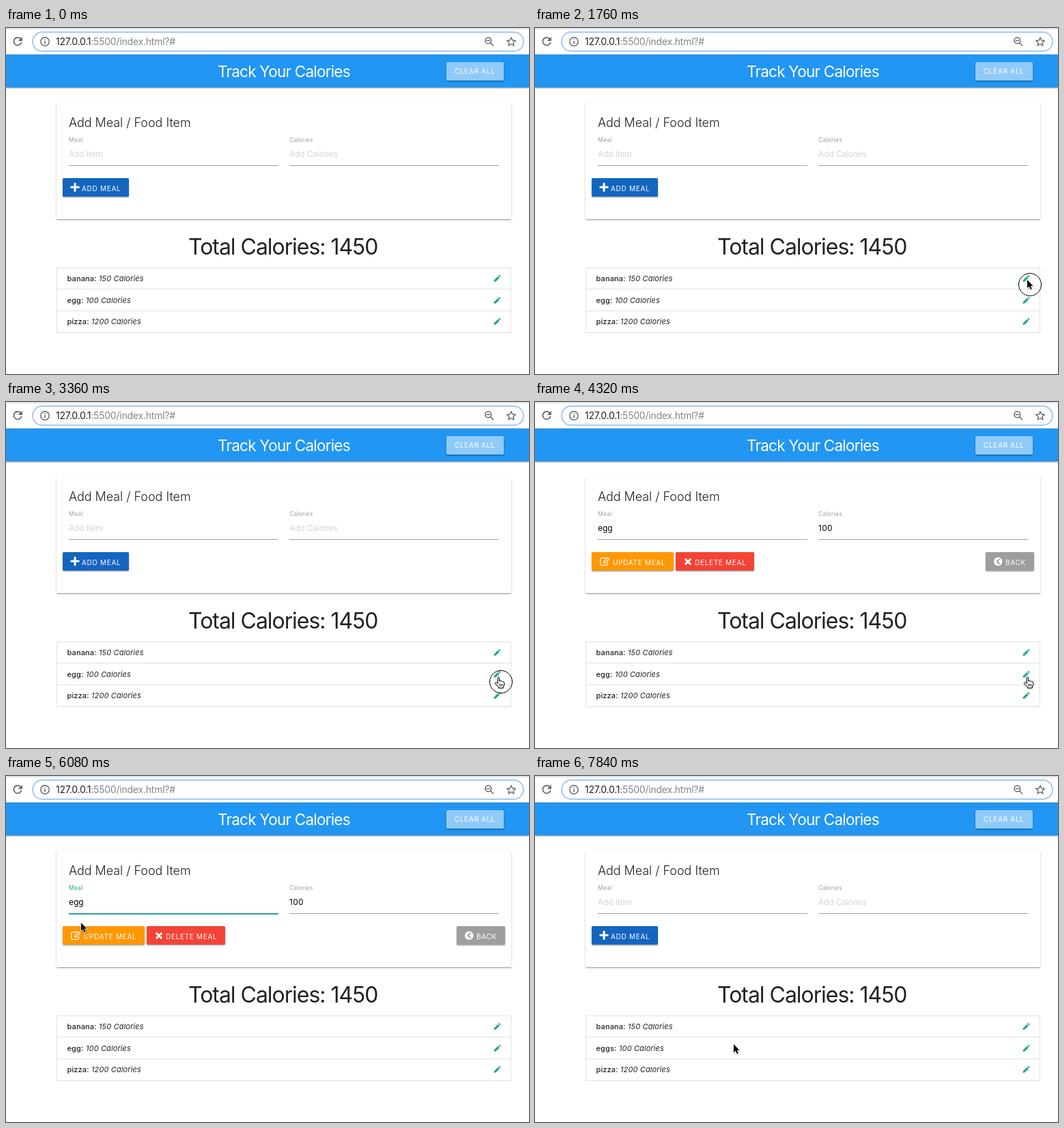
An HTML page for the animation above (8000 ms loop, 766 px wide and 507 px high).

```html
<!DOCTYPE html>
<html lang="en">
<head>
<meta charset="utf-8">
<title>Calorie tracker</title>
<style>
html, body { margin: 0; width: 100%; height: 100%; overflow: hidden; background: #fff; }
#stage { position: relative; width: 766px; height: 507px; overflow: hidden; background: #fff; }
.box { position: absolute; border-radius: 1.5px; }
.raised { box-shadow: 0 1.5px 1.5px rgba(0,0,0,.14), 0 2px 1px -1px rgba(0,0,0,.12), 0 1px 3px rgba(0,0,0,.2); }
svg { position: absolute; left: 0; top: 0; }
text { font-family: Inter, "Open Sans", sans-serif; font-optical-sizing: none; white-space: pre; }
.url { font-size: 14px; letter-spacing: -.22px; fill: #80868b; }
.brand { font-size: 22.6px; letter-spacing: -.8px; fill: #fff; }
.head { font-size: 18px; font-weight: 300; letter-spacing: -.05px; fill: #212121; }
.total { font-size: 32px; letter-spacing: -1.02px; fill: #212121; }
.btn { font-size: 10px; letter-spacing: .7px; fill: #fff; }
.label { font-size: 8.5px; letter-spacing: .22px; fill: #9e9e9e; }
.hint { font-size: 12px; font-weight: 300; letter-spacing: -.05px; fill: #c9c9c9; }
.value { font-size: 12px; fill: #000; }
.name { font-size: 11px; font-weight: 500; letter-spacing: .12px; fill: #212121; }
.count { font-size: 11px; font-style: italic; letter-spacing: .12px; fill: #212121; }
.line { fill: none; stroke-linecap: round; stroke-linejoin: round; }
</style>
</head>
<body>
<div id="stage">
  <div class="box" style="left:0;top:0;width:766px;height:2px;background:#e3e4e6"></div>
  <div class="box" style="left:0;top:38px;width:766px;height:1px;background:#cfd1d4"></div>
  <div class="box raised" style="left:0;top:39px;width:766px;height:48px;background:#2196f3;border-radius:0"></div>
  <div class="box raised" style="left:645px;top:50px;width:84px;height:27px;background:#90caf9"></div>
  <div class="box raised" style="left:74px;top:109px;width:666px;height:171px;background:#fff"></div>
  <div id="addBox" class="box raised" style="left:83px;top:220px;width:97px;height:27px;background:#1565c0"></div>
  <div id="editBoxes">
    <div class="box raised" style="left:83px;top:220px;width:120px;height:27px;background:#ff9800"></div>
    <div class="box raised" style="left:206px;top:220px;width:115px;height:27px;background:#f44336"></div>
    <div class="box raised" style="left:660px;top:220px;width:71px;height:27px;background:#9e9e9e"></div>
  </div>

  <svg width="766" height="507" viewBox="0 0 766 507">
    <defs>
      <g id="pencil" fill="#26a69a">
        <path d="M0 10 .5 7.2 5.9 1.8 8.3 4.2 2.9 9.6Z"/>
        <path d="M6.6 1.1 7.5.3Q8.1-.1 8.6.3L9.8 1.5Q10.2 2 9.8 2.6L9 3.5Z"/>
      </g>
    </defs>

    <!-- browser bar -->
    <g class="line" stroke="#5f6368" stroke-width="1.7">
      <path d="M21.6 16.2A5.7 5.7 0 1 0 22.5 21.4"/>
      <circle cx="57" cy="20" r="6.2" stroke-width="1.4"/>
      <path d="M57 19.6V23M57 17V17.1" stroke-width="1.5"/>
      <circle cx="706.3" cy="18.4" r="4.4" stroke-width="1.5"/>
      <path d="M709.7 21.8 713.6 25.7M704.3 18.4H708.3" stroke-width="1.5"/>
      <path d="M740 13.8 741.8 18 746.4 18.4 742.9 21.4 744 25.9 740 23.5 736 25.9 737.1 21.4 733.6 18.4 738.2 18Z" stroke-width="1.3"/>
    </g>
    <path d="M23.8 13V19H17.8Z" fill="#5f6368"/>
    <rect x="39" y="6" width="719" height="28" rx="14" fill="none" stroke="#a8c7fa" stroke-width="2"/>
    <text class="url" x="73" y="25"><tspan fill="#202124">127.0.0.1</tspan>:5500/index.html?#</text>

    <!-- page -->
    <text class="brand" x="310" y="72">Track Your Calories</text>
    <text class="btn" x="657" y="67">CLEAR ALL</text>
    <text class="head" x="92" y="145">Add Meal / Food Item</text>
    <text class="label" id="mealLabel" x="92" y="167">Meal</text>
    <text class="label" x="415" y="167">Calories</text>
    <rect id="mealLine" x="92" y="201" width="307" height="1"/>
    <rect x="415" y="201" width="307" height="1" fill="#9e9e9e"/>

    <g id="addView">
      <text class="hint" x="92" y="189">Add Item</text>
      <text class="hint" x="415" y="189">Add Calories</text>
      <path d="M101 228V238.6M95.7 233.3H106.3" class="line" stroke="#fff" stroke-width="3"/>
      <text class="btn" x="111" y="239">ADD MEAL</text>
    </g>

    <g id="editView">
      <text class="value" id="mealValue" x="92" y="189"></text>
      <text class="value" x="415" y="189" letter-spacing=".3">100</text>
      <g class="line" stroke="#fff">
        <path d="M104 228.6H97.5Q95.7 228.6 95.7 230.4V237.6Q95.7 239.4 97.5 239.4H104.5Q106.3 239.4 106.3 237.6V235.5" stroke-width="1.2"/>
        <path d="M101.2 233.6 106.6 228.2 108.6 230.2 103.2 235.6 100.8 236Z" stroke-width="1.2"/>
        <path d="M220.7 230.7 227.3 237.3M227.3 230.7 220.7 237.3" stroke-width="3"/>
      </g>
      <circle cx="678.3" cy="233.8" r="6.2" fill="#fff"/>
      <path d="M679.8 230.6 676.5 233.8 679.8 237" class="line" stroke="#9e9e9e" stroke-width="1.9"/>
      <text class="btn" x="114" y="239">UPDATE MEAL</text>
      <text class="btn" x="234" y="239">DELETE MEAL</text>
      <text class="btn" x="689" y="239">BACK</text>
    </g>

    <text class="total" x="267" y="332">Total Calories: 1450</text>
    <path d="M74.5 351.5H739.5V446.5H74.5ZM74.5 382.5H739.5M74.5 414.5H739.5" fill="none" stroke="#e0e0e0"/>
    <text class="name" x="89.5" y="371">banana:</text>
    <text class="count" x="136" y="371">150 Calories</text>
    <text class="name" id="eggName" x="89.5" y="403"></text>
    <text class="count" id="eggCount" x="117" y="403">100 Calories</text>
    <text class="name" x="89.5" y="434">pizza:</text>
    <text class="count" x="125" y="434">1200 Calories</text>
    <use href="#pencil" x="714.5" y="362"/>
    <use href="#pencil" x="714.5" y="394"/>
    <use href="#pencil" x="714.5" y="425"/>

    <!-- pointer, origin at its hot spot -->
    <g id="pointer">
      <circle id="ring" cx="4" cy="7" r="16.5" fill="none" stroke="#000"/>
      <g id="arrow" style="filter:drop-shadow(0 1px 1px rgba(0,0,0,.3))">
        <path d="M0 0V12L2.8 9.5 4.8 14 6.7 13.2 4.8 8.8H8.4Z" stroke="#fff" stroke-width="1.4" paint-order="stroke"/>
      </g>
      <g id="hand" transform="translate(-5.5 -.5)" style="filter:drop-shadow(0 1px 1px rgba(0,0,0,.3))">
        <path d="M4.8 10V2Q4.8.6 6 .6T7.2 2V6.5Q8.6 5.3 9.6 6.6 10.9 5.8 11.8 7.3 14 6.8 14.2 9V11.5Q13.6 14 12.8 14.5V16.5H6V15L1.2 10.2Q.4 8.7 1.8 8.2 3 8 4.8 10Z" fill="#fff" stroke="#000" stroke-linejoin="round"/>
        <path d="M7.3 10.5V14M9.3 10.5V14M11.3 10.5V14" stroke="#000" stroke-width=".9"/>
      </g>
      <path id="beam" class="line" d="M-2.5-7.5Q0-7.5 0-5.5 0-7.5 2.5-7.5M0-5.5V5.5M-2.5 7.5Q0 7.5 0 5.5 0 7.5 2.5 7.5M-1.5 3H1.5" stroke="#000"/>
    </g>
  </svg>
</div>
<script>
const LOOP = 8000;
const EDIT = 4160, FOCUS = 5920, TYPED = 6400, SAVED = 7360;

// time, x, y, shape, ring
const steps = [
  [960, 688, 434, 'arrow', 0],
  [1120, 715, 391, 'arrow', 0],
  [1280, 721, 369, 'arrow', 1],
  [1440, 722, 366, 'arrow', 1],
  [1600, 722, 367, 'arrow', 1],
  [1760, 721, 369, 'arrow', 1],
  [1920, 721, 371, 'arrow', 1],
  [2240, 721, 381, 'arrow', 1],
  [2400, 721, 390, 'arrow', 1],
  [3040, 721, 394, 'hand', 1],
  [3200, 721, 400, 'hand', 1],
  [3360, 721, 403, 'hand', 1],
  [4320, 721, 403, 'hand', 0],
  [4640, 708, 399, 'arrow', 0],
  [4800, 625, 367, 'arrow', 0],
  [4960, 465, 308, 'arrow', 0],
  [5120, 302, 247, 'arrow', 0],
  [5280, 184, 209, 'arrow', 0],
  [5440, 134, 193, 'beam', 0],
  [5600, 110, 215, 'arrow', 1],
  [6080, 110, 215, 'arrow', 0],
  [6560, 176, 186, 'beam', 0],
  [6880, 165, 204, 'arrow', 0],
  [7040, 134, 223, 'hand', 0],
  [7200, 113, 237, 'hand', 0],
  [7520, 160, 300, 'arrow', 0],
  [7680, 264, 412, 'arrow', 0],
  [7840, 291, 393, 'arrow', 0]
];

const $ = id => document.getElementById(id);
const show = (id, on) => { $(id).style.display = on ? '' : 'none'; };

function drawPointer(t) {
  const step = steps.filter(s => s[0] <= t).pop();
  show('pointer', step);
  if (!step) return;
  const [, x, y, shape, ring] = step;
  $('pointer').setAttribute('transform', `translate(${x} ${y})`);
  for (const id of ['arrow', 'hand', 'beam']) show(id, id === shape);
  show('ring', ring);
}

function draw(t) {
  const editing = t >= EDIT && t < SAVED;
  const focused = t >= FOCUS && t < SAVED;
  const saved = t >= SAVED;
  for (const id of ['addBox', 'addView']) show(id, !editing);
  for (const id of ['editBoxes', 'editView']) show(id, editing);
  $('mealValue').textContent = t >= TYPED ? 'eggs' : 'egg';
  $('mealLabel').style.fill = focused ? '#26a69a' : '#9e9e9e';
  $('mealLine').setAttribute('fill', focused ? '#26a69a' : '#9e9e9e');
  $('mealLine').setAttribute('height', focused ? 2 : 1);
  $('eggName').textContent = saved ? 'eggs:' : 'egg:';
  $('eggCount').setAttribute('x', saved ? 123 : 117);
  drawPointer(t);
}

const start = performance.now();
function tick() {
  draw((performance.now() - start) % LOOP);
  requestAnimationFrame(tick);
}
tick();
</script>
</body>
</html>
```
